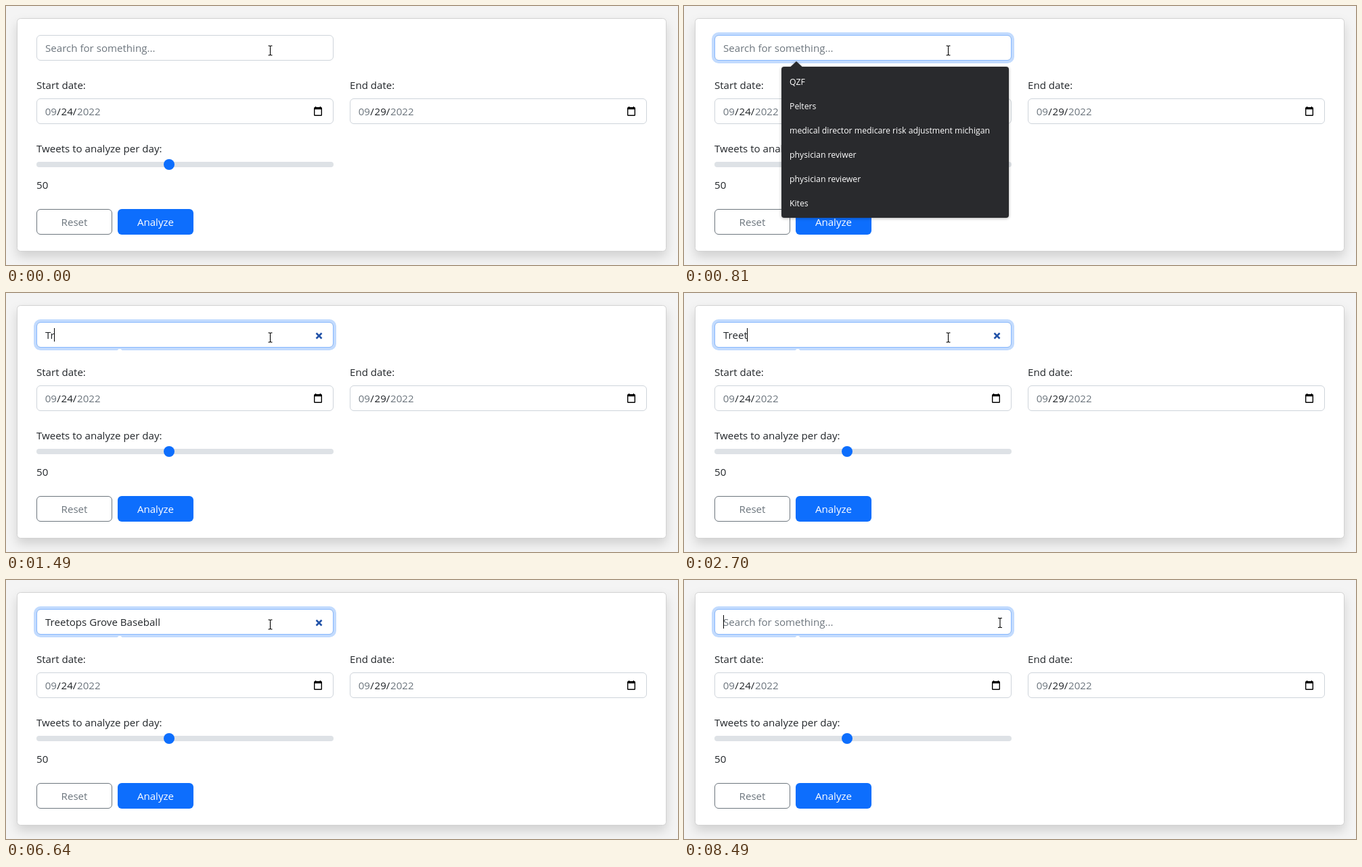
Recreate the animation shown at these times as an HTML page. Size 993 px wide and 384 px high, loop 8720 ms.

```html
<!DOCTYPE html>
<html lang="en">
<head>
<meta charset="utf-8">
<title>Search form</title>
<style>
  html, body { margin: 0; width: 100%; height: 100%; overflow: hidden; background: #f4f4f4; }
  svg { display: block; width: 993px; height: 384px; }
  text { font: 15.1px "Open Sans", "Noto Sans", sans-serif; fill: #212529; white-space: pre; }
  .muted { fill: #6c757d; }
  .field { fill: #fff; stroke: #ced4da; }
  .menu { filter: drop-shadow(0 1px 2px rgba(0, 0, 0, .3)); }
  .menu text { font-size: 12.25px; fill: #fff; }
  .card { filter: drop-shadow(0 8px 8px rgba(0, 0, 0, .15)); }
</style>
</head>
<body>
<svg viewBox="0 0 993 384">
  <defs>
    <g id="calendar" fill="none" stroke="#000">
      <rect x="-5.3" y="-5.3" width="10.6" height="11.6" rx=".8" stroke-width="1.4"/>
      <path d="M-5.3 -4H5.3" stroke-width="2.6"/>
      <path d="M-3.4 -7V-4M3.4 -7V-4" stroke-width="1.4"/>
    </g>
  </defs>
  <rect width="993" height="384" fill="#f4f4f4"/>
  <rect class="card" x="16.5" y="18.5" width="959" height="345" rx="5" fill="#fff"/>
  <rect x="16.5" y="18.5" width="959" height="345" rx="5" fill="none" stroke="#d2d2d2"/>

  <rect class="field" x="45.5" y="43.5" width="438" height="37" rx="5.5"/>
  <g id="focus" fill="none">
    <rect x="43" y="41" width="443" height="42" rx="8" stroke="#c2dbfe" stroke-width="4"/>
    <rect x="45.5" y="43.5" width="438" height="37" rx="5.5" stroke="#86b7fe"/>
    <path id="notch" d="M164.5 85L166.5 83H169.5L171.5 85Z" fill="#fff"/>
  </g>
  <circle id="click" r="12" cy="63.5" fill="#ffff6e"/>
  <text id="hint" class="muted" x="58" y="68">Search for something...</text>
  <text id="typed" x="58" y="68"></text>
  <rect id="caret" y="52" width="1" height="20" fill="#000"/>
  <path id="clear" d="M458.5 59.5L466.5 67.5M466.5 59.5L458.5 67.5" stroke="#2152a8" stroke-width="2.5"/>

  <g id="dates"></g>

  <text x="45" y="217">Tweets to analyze per day:</text>
  <rect x="45" y="231" width="439" height="8" rx="4" fill="#dee2e6"/>
  <circle cx="241" cy="235" r="8" fill="#0d6efd"/>
  <text x="45" y="271">50</text>

  <rect x="45.5" y="301.5" width="111" height="37" rx="5.5" fill="#fff" stroke="#6c757d"/>
  <text class="muted" x="101" y="326" text-anchor="middle">Reset</text>
  <rect x="165" y="301" width="112" height="38" rx="6" fill="#0d6efd"/>
  <text x="221" y="326" text-anchor="middle" style="fill:#fff">Analyze</text>

  <g id="history" class="menu"></g>
  <g id="match" class="menu"></g>

  <path id="beam" d="M-3 -7H-1L0 -6L1 -7H3M0 -6V6M-3 7H-1L0 6L1 7H3" fill="none" stroke="#000" stroke-width="1.1"/>
  <path id="arrow" d="M.5 .5V15.5L4 12.2L6.6 18.2L9 17.2L6.4 11.4H11.3Z" fill="#fff" stroke="#000"/>
</svg>
<script>
const LOOP = 8720;
const PHRASE = 'Treetops Grove Baseball';
const FOCUS = 260, CLICK = 7930, CLEARED = 8010;
const BLINK = 500;

// Runs of evenly spaced key presses
const BURSTS = [
  { start: 1180, gap: 180, count: 3 },
  { start: 2170, gap: 100, count: 1 },
  { start: 2700, gap: 100, count: 3 },
  { start: 3740, gap: 110, count: 8 },
  { start: 5220, gap: 131, count: 8 }
];

// Eased pointer moves
const START = { x: 390.5, y: 66 };
const MOVES = [
  { from: 6880, to: 7180, x: 461, y: 61 },
  { from: 7280, to: 7420, x: 457, y: 62.5 },
  { from: 8100, to: 8400, x: 467, y: 63.5 }
];

const $ = id => document.getElementById(id);
const ramp = (t, a, b) => Math.min(1, Math.max(0, (t - a) / (b - a)));
const ease = p => p * p * (3 - 2 * p);
const show = (id, on) => $(id).setAttribute('visibility', on ? 'visible' : 'hidden');
const fade = (id, value) => $(id).setAttribute('opacity', value);

function dateField(x, label, day) {
  const part = (dx, text, cls = '') => `<text class="${cls}" x="${x + dx}" y="162">${text}</text>`;
  return `<text x="${x}" y="123">${label}</text>
    <rect class="field" x="${x + .5}" y="137.5" width="438" height="37" rx="5.5"/>
    ${part(12.7, '09', 'muted')}${part(30.3, '/')}${part(36.5, day)}${part(53.7, '/')}${part(60, '2022', 'muted')}
    <use href="#calendar" x="${x + 416}" y="156"/>`;
}

function menu(width, items) {
  const rows = items.map((s, i) => `<text x="156" y="${117 + 36 * i}">${s}</text>`).join('');
  return `<rect x="144" y="90" width="${width}" height="${36 * items.length + 8}" rx="4" fill="#292a2d"/>
    <path d="M157 90.5L166 82L175 90.5Z" fill="#292a2d"/>${rows}`;
}

$('dates').innerHTML = dateField(45, 'Start date:', '24') + dateField(508, 'End date:', '29');
$('history').innerHTML = menu(336, [
  'QZF', 'Pelters', 'medical director medicare risk adjustment michigan',
  'physician reviwer', 'physician reviewer', 'Kites'
]);
$('match').innerHTML = menu(144, ['the marmot gourd']);

// Letters shown and time of the latest input
function typing(t) {
  if (t >= CLEARED) return { letters: 0, last: CLEARED };
  let letters = 0, last = FOCUS;
  for (const { start, gap, count } of BURSTS) {
    if (t < start) break;
    const pressed = Math.min(count, Math.floor((t - start) / gap) + 1);
    letters += pressed;
    last = start + (pressed - 1) * gap;
  }
  return { letters, last };
}

function pointer(t) {
  return MOVES.reduce((p, m) => {
    const k = ease(ramp(t, m.from, m.to));
    return { x: p.x + (m.x - p.x) * k, y: p.y + (m.y - p.y) * k };
  }, START);
}

function draw(t) {
  const { letters, last } = typing(t);
  $('typed').textContent = PHRASE.slice(0, letters);
  show('hint', !letters);
  show('clear', letters);

  const width = letters ? $('typed').getComputedTextLength() : 0;
  $('caret').setAttribute('x', Math.floor(58 + width));
  show('caret', t >= FOCUS && (t - last) % (2 * BLINK) < BLINK);

  fade('focus', ramp(t, 300, 410));
  show('notch', t >= 1330);
  show('history', t >= FOCUS && !letters && t < CLICK);
  show('match', letters && t < 1480);
  fade('match', 1 - ramp(t, 1330, 1480));

  const { x, y } = pointer(t);
  const isArrow = letters && x > 455;
  for (const id of ['beam', 'arrow']) $(id).setAttribute('transform', `translate(${x} ${y})`);
  show('beam', !isArrow);
  show('arrow', isArrow);

  const pressedAt = t < CLICK ? FOCUS : CLICK;
  $('click').setAttribute('cx', x - 1);
  fade('click', t < FOCUS ? 0 : 1 - ramp(t, pressedAt + 80, pressedAt + 150));
}

function tick() {
  draw(performance.now() % LOOP);
  requestAnimationFrame(tick);
}
tick();
</script>
</body>
</html>
```
